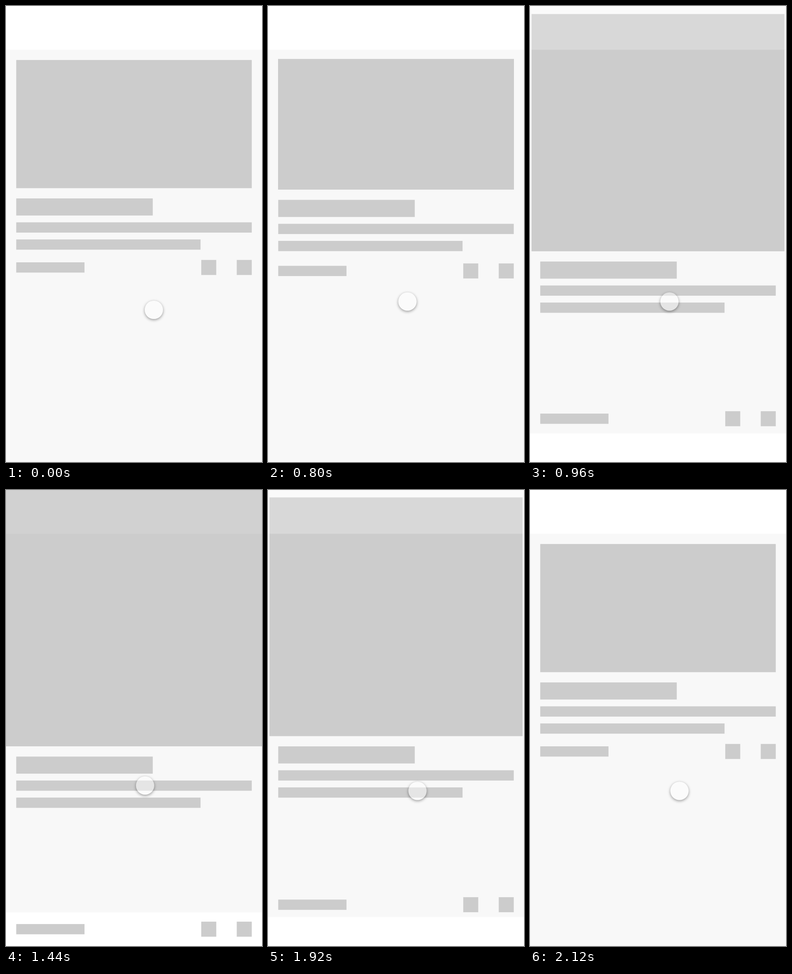
These frames come from a looping animation (561 px wide and 998 px high, 2280 ms). An HTML page with a canvas:

```html
<!DOCTYPE html>
<html lang="en">
<head>
<meta charset="utf-8">
<title>Expanding card</title>
<style>
  html, body { margin: 0; width: 100%; height: 100%; overflow: hidden; background: #fff; }
  canvas { display: block; width: 100%; height: 100%; }
</style>
</head>
<body>
<canvas id="stage" width="561" height="998"></canvas>
<script>
const ctx = document.getElementById('stage').getContext('2d');
const LOOP = 2280, STEP = 40;
const WIDTH = 375, HEIGHT = 668, SCALE = 561 / WIDTH;

const clamp = x => Math.min(1, Math.max(0, x));
const mix = (a, b, k) => a + (b - a) * k;
const smooth = x => x * x * (3 - 2 * x);
const progress = (t, start, duration) => clamp((t - start) / duration);

// cubic-bezier(.8, 0, .2, 1), solved by bisection
function ease(x) {
  let low = 0, high = 1;
  for (let i = 0; i < 24; i++) {
    const u = (low + high) / 2, v = 1 - u;
    if (2.4 * u * v * v + 0.6 * u * u * v + u * u * u < x) low = u;
    else high = u;
  }
  return smooth(low);
}

function openness(t) {
  if (t < 1040) return ease(progress(t, 739, 354));
  return 1 - ease(progress(t, 1810, 300));
}

function pointerAt(t) {
  if (t < 600) {
    const k = smooth(progress(t, 0, 490));
    return [mix(324, 306.2, k), mix(665, 646.8, k)];
  }
  if (t < 1440) return [305.6, 646.8];
  const k = smooth(progress(t, 1440, 290));
  return [mix(304.8, 327.6, k), mix(646.8, 658.5, k)];
}

function box(x, y, w, h, color = '#ccc') {
  ctx.fillStyle = color;
  ctx.fillRect(x, y, w, h);
}

function drawCard(p) {
  const inset = mix(15, 0, p), top = mix(79, 0, p), bottom = mix(266.5, 375, p);
  const footer = mix(371.5, 631.5, p), barTop = mix(667, 618, p);

  box(0, 0, WIDTH, HEIGHT, '#f8f8f8');
  box(inset, top, WIDTH - 2 * inset, bottom - top);
  box(15, bottom + 15, 200, 25);
  box(15, bottom + 50, 345, 15);
  box(15, bottom + 75, 270, 15);

  box(0, 0, WIDTH, 64, `rgba(255,255,255,${mix(1, 0.1, p)})`);
  box(0, barTop, WIDTH, HEIGHT - barTop, '#fff');
  box(15, footer + 3.5, 100, 15);
  box(286, footer, 22, 22);
  box(338, footer, 22, 22);
}

function drawPointer(x, y) {
  const radius = 20, away = 2000;
  ctx.save();
  ctx.beginPath();
  ctx.rect(0, 0, 561, 998);
  ctx.arc(x, y, radius, 0, Math.PI * 2);
  ctx.clip('evenodd');
  // Only the shadow of this far-off disc lands on the stage.
  ctx.shadowColor = 'rgba(0,0,0,.4)';
  ctx.shadowBlur = 6;
  ctx.shadowOffsetX = away;
  ctx.shadowOffsetY = 2;
  ctx.beginPath();
  ctx.arc(x - away, y, radius, 0, Math.PI * 2);
  ctx.fillStyle = '#000';
  ctx.fill();
  ctx.restore();

  ctx.beginPath();
  ctx.arc(x, y, radius, 0, Math.PI * 2);
  ctx.fillStyle = 'rgba(255,255,255,.5)';
  ctx.fill();
}

function draw(now) {
  const t = Math.floor((now % LOOP) / STEP) * STEP;
  ctx.setTransform(SCALE, 0, 0, SCALE, 0, 0);
  drawCard(openness(t));
  ctx.setTransform(1, 0, 0, 1, 0, 0);
  drawPointer(...pointerAt(t));
}

let start;
function tick(now) {
  start ??= now;
  draw(now - start);
  requestAnimationFrame(tick);
}
draw(0);
requestAnimationFrame(tick);
</script>
</body>
</html>
```
